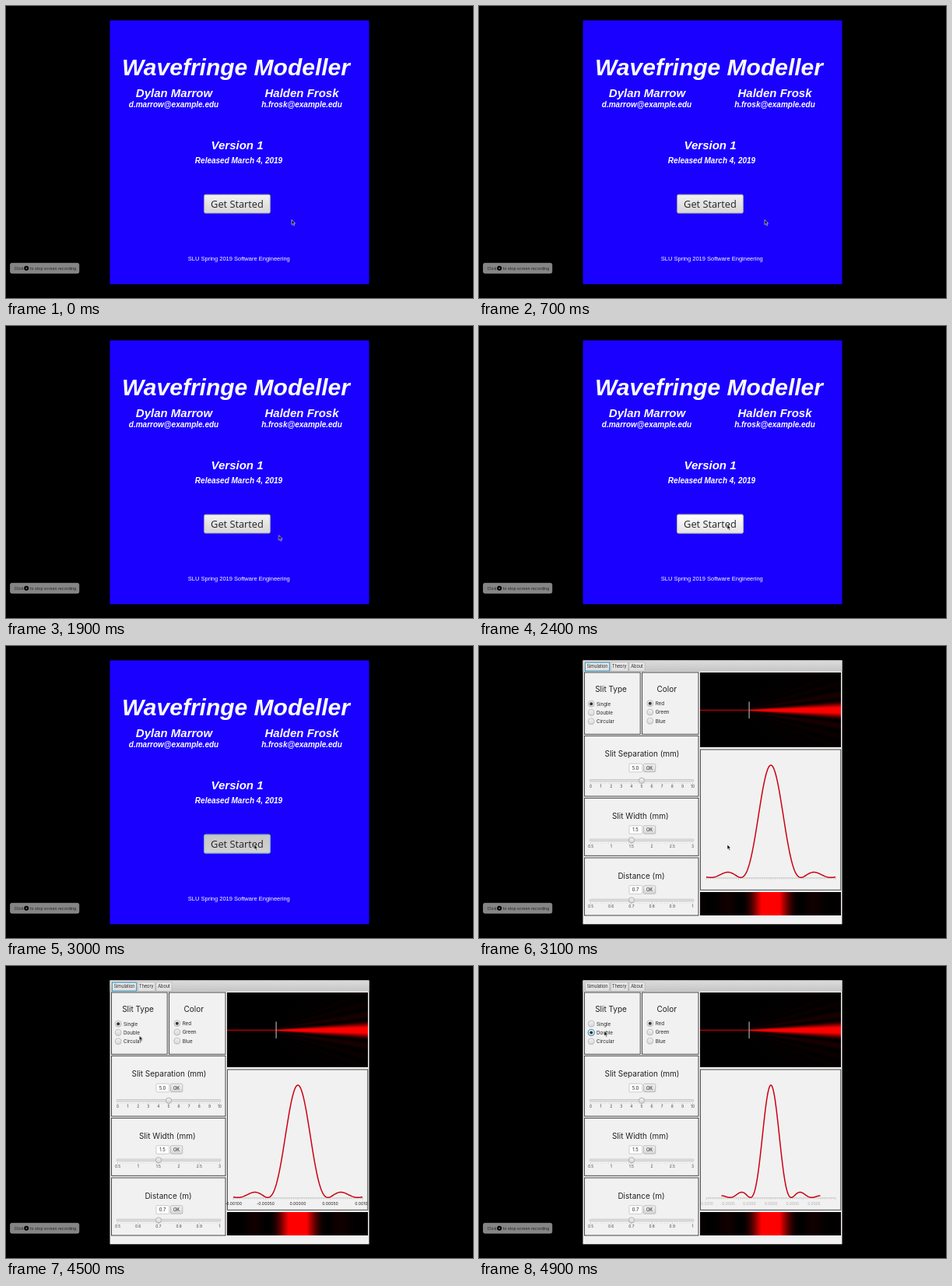
Write an HTML page with a canvas that moves like this. It is 600x375 px and loops after 5000 ms.

```html
<!DOCTYPE html>
<html lang="en">
<head>
<meta charset="utf-8">
<title>Wavefringe Modeller</title>
<style>
  html, body { margin: 0; width: 100%; height: 100%; overflow: hidden; background: #000; }
  svg { position: absolute; left: 0; top: 0; }
  canvas { position: absolute; left: 284px; top: 34px; }
  text { font-family: Inter, "Liberation Sans", sans-serif; fill: #222; }
  .mid { text-anchor: middle; }
  .head text { font: italic bold 15px "Liberation Sans", Arial, sans-serif; fill: #fff; text-anchor: middle; }
  .head .title { font-size: 30px; }
  .head .small { font-size: 10px; }
  .head .foot { font: 7.5px "Liberation Sans", Arial, sans-serif; }
  .start { font: 12.8px "Open Sans", "Noto Sans", sans-serif; }

  .step { animation: 5s step-end infinite; }
  .intro { animation-name: intro; }
  .app { animation-name: app; }
  .hover { animation-name: hover; }
  .press { animation-name: press; }
  .before { animation-name: before; }
  .after { animation-name: after; }
  .wide { animation-name: wide; }
  .narrow { animation-name: narrow; }
  .labels { animation: labels 5s linear infinite; }
  .cursor { animation: move 5s infinite; }

  @keyframes intro { 0% { opacity: 1 } 62%, 100% { opacity: 0 } }
  @keyframes app { 0% { opacity: 0 } 62%, 100% { opacity: 1 } }
  @keyframes hover { 0% { opacity: 0 } 44% { opacity: 1 } 58%, 100% { opacity: 0 } }
  @keyframes press { 0% { opacity: 0 } 58% { opacity: 1 } 62%, 100% { opacity: 0 } }
  @keyframes before { 0% { opacity: 1 } 96%, 100% { opacity: 0 } }
  @keyframes after { 0% { opacity: 0 } 96%, 100% { opacity: 1 } }
  @keyframes wide { 0% { opacity: 1 } 98%, 100% { opacity: 0 } }
  @keyframes narrow { 0% { opacity: 0 } 98%, 100% { opacity: 1 } }
  @keyframes labels {
    0% { opacity: 0 }
    62% { opacity: 0; animation-timing-function: steps(7) }
    76%, 100% { opacity: 1 }
  }
  @keyframes move {
    0% { transform: translate(367px, 274.5px) }
    34% { transform: translate(367px, 274.5px); animation-timing-function: steps(4) }
    42% { transform: translate(334px, 263px); animation-timing-function: steps(3) }
    48% { transform: translate(319px, 255px) }
    66% { transform: translate(319px, 255px); animation-timing-function: steps(7) }
    80% { transform: translate(192px, 101.5px) }
    82% { transform: translate(192px, 101.5px); animation-timing-function: steps(6) }
    94%, 100% { transform: translate(161px, 83.5px) }
  }
</style>
</head>
<body>
<svg id="stage" width="600" height="375" viewBox="0 0 600 375"></svg>
<canvas id="light" width="181" height="312" class="step app"></canvas>
<script>
const sinc2 = u => u ? (Math.sin(Math.PI * u) / (Math.PI * u)) ** 2 : 1;
const range = n => [...Array(n).keys()];

const rect = (x, y, x2, y2, fill, stroke = 'none', more = '') =>
  `<rect x="${x}" y="${y}" width="${x2 - x}" height="${y2 - y}" fill="${fill}" stroke="${stroke}" ${more}/>`;
const text = (x, y, s, size, cls = '', more = '') =>
  `<text x="${x}" y="${y}" class="${cls}" ${size ? `font-size="${size}"` : ''} ${more}>${s}</text>`;
const group = (cls, ...parts) => `<g class="${cls}">${parts.join('')}</g>`;
const dot = (x, y, r, fill, stroke = 'none', w = 0.7) =>
  `<circle cx="${x}" cy="${y}" r="${r}" fill="${fill}" stroke="${stroke}" stroke-width="${w}"/>`;
const grad = (id, a, b) =>
  `<linearGradient id="${id}" x2="0" y2="1"><stop stop-color="${a}"/><stop offset="1" stop-color="${b}"/></linearGradient>`;

const startBox = (fill, stroke) => rect(254.7, 242.2, 339.3, 266, fill, stroke, 'rx="1.5"');

function intro() {
  return group('step intro',
    rect(133.5, 18.5, 466.5, 357.3, '#1a00ff'),
    group('head',
      text(295.5, 88.5, 'Wavefringe Modeller', 0, 'title'),
      text(216, 117, 'Dylan Marrow'),
      text(215.5, 129.7, 'd.marrow@example.edu', 0, 'small'),
      text(380, 117, 'Halden Frosk'),
      text(380, 129.7, 'h.frosk@example.edu', 0, 'small'),
      text(297, 184, 'Version 1'),
      text(299, 202.2, 'Released March 4, 2019', 0, 'small'),
      text(299.3, 327.4, 'SLU Spring 2019 Software Engineering', 0, 'foot')),
    startBox('url(#btn)', '#aaa'),
    group('step hover', startBox('url(#btnHover)', '#bbb')),
    group('step press', startBox('url(#btnPress)', '#79a9c9')),
    text(297, 258.6, 'Get Started', 0, 'start mid'));
}

const radio = (x, y, label) =>
  dot(x, y, 4, 'url(#btn)', '#aaa') + text(x + 6.9, y + 2.3, label, 6.2);

const panel = (x, y, x2, y2) => rect(x, y, x2, y2, '#f1f1f1', '#333', 'stroke-width=".9"');

function tabs() {
  const tab = (x, x2, label) =>
    rect(x, 21, x2, 32.4, 'url(#tab)', '#aaa', 'stroke-width=".6"') + text((x + x2) / 2, 28.4, label, 5.5, 'mid');
  return rect(133.5, 18.5, 466.5, 32, 'url(#strip)') +
    rect(133.5, 32, 466.5, 32.6, '#b4b4b4') +
    tab(136.3, 167.7, 'Simulation') + tab(169.3, 191.5, 'Theory') + tab(193, 213, 'About') +
    group('step before', rect(136.4, 21.2, 167.6, 32, 'none', '#2f9bc9', 'stroke-width=".9"'));
}

function slider(title, tx, ty, fy, value, sy, thumb, labels) {
  const gap = 131 / (labels.length - 1);
  const minor = range(41).map(i => `M${143.5 + i * 3.275} ${sy + 3.2}v1`).join('');
  const major = labels.map((l, i) => `M${143.5 + i * gap} ${sy + 3.2}v2`).join('');
  return text(tx, ty, title, 10, 'mid') +
    rect(193, fy - 5.3, 209.7, fy + 5.3, '#fff', '#bbb', 'rx="1" stroke-width=".7"') +
    text(201, fy + 2.1, value, 5.9, 'mid') +
    rect(211.5, fy - 5.2, 226.8, fy + 5.2, 'url(#btn)', '#aaa', 'rx="1.2" stroke-width=".7"') +
    text(219.1, fy + 2.1, 'OK', 5.7, 'mid') +
    rect(142, sy - 1.3, 276, sy + 1.3, '#e0e0e0', '#b5b5b5', 'rx="1.2" stroke-width=".6"') +
    `<path d="${minor}${major}" stroke="#aaa" stroke-width=".4"/>` +
    dot(thumb, sy, 3.6, 'url(#btn)', '#999') +
    labels.map((l, i) => text(143.5 + i * gap, sy + 9.6, l, 4.9, 'mid', 'fill-opacity=".85"')).join('');
}

// Single-slit pattern: first dark fringe at `zero`, drawn out to `reach`
function curve(zero, reach) {
  const pts = range(201).map(i => {
    const x = (i / 100 - 1) * reach;
    return `${(375 + x).toFixed(2)} ${(297.3 - 144.3 * sinc2(x / zero)).toFixed(2)}`;
  });
  return `<path d="M${pts.join('L')}" fill="none" stroke="#cc0012" stroke-width="1.5" stroke-linejoin="round"/>`;
}

function chart() {
  const ticks = range(61).map(i => `M${292 + i * 2.767} 297.8v${i % 15 ? 1.6 : 2.6}`).join('');
  const wideLabels = range(5).map(i => text(292 + i * 41.5, 306.8, ((i - 2) * 0.0005).toFixed(5), 5.2, 'mid'));
  const newLabels = ['-0.0010', '-0.0005', '0.0000', '0.0000', '0.0000', '0.0005']
    .map((l, i) => text(292 + i * 27.7, 306.6, l, 4.9, 'mid', 'opacity=".3"'));
  return panel(284.4, 133, 464.8, 313.3) +
    `<path d="M292 297.8H458.5${ticks}" stroke="#aaa" stroke-width=".5"/>` +
    `<g clip-path="url(#plot)">` +
    group('step wide', group('labels', ...wideLabels), curve(38.6, 83)) +
    group('step narrow', ...newLabels, curve(26.2, 63.5)) + '</g>';
}

function app() {
  return group('step app',
    rect(133.5, 18.5, 466.5, 357.3, '#f1f1f1'),
    tabs(),
    panel(135.5, 34, 207.2, 113.3), panel(209.5, 34, 282, 113.3),
    panel(135.5, 115.4, 282, 193), panel(135.5, 195.3, 282, 269.3), panel(135.5, 272, 282, 346),
    text(169.5, 58.7, 'Slit Type', 10, 'mid'), text(241.2, 58.9, 'Color', 10, 'mid'),
    radio(144.2, 74.2, 'Single'), radio(144.2, 85.5, 'Double'), radio(144.2, 96.8, 'Circular'),
    radio(219.8, 73.7, 'Red'), radio(219.8, 85, 'Green'), radio(219.8, 96.3, 'Blue'),
    dot(219.8, 73.7, 2, '#333'),
    group('step before', dot(144.2, 74.2, 2, '#333')),
    group('step after', dot(144.2, 85.5, 4, 'url(#btnHover)', '#2f8fc4', 1.1), dot(144.2, 85.5, 2, '#333')),
    slider('Slit Separation (mm)', 209.5, 141.5, 156.5, '5.0', 172.8, 209, range(11)),
    slider('Slit Width (mm)', 207.3, 222, 236, '1.5', 249.3, 196, [0.5, 1, 1.5, 2, 2.5, 3]),
    slider('Distance (m)', 208.5, 299, 313, '0.7', 326.5, 196, [0.5, 0.6, 0.7, 0.8, 0.9, 1]),
    chart());
}

function recorder() {
  return rect(5.5, 330.3, 93.8, 343.2, '#858585', '#a0a0a0', 'rx="2" stroke-width=".6"') +
    text(10.5, 338.8, 'Click', 5.2) + dot(26.2, 336.8, 3, '#000') + dot(26.2, 336.8, 0.9, '#999') +
    text(30.8, 338.8, 'to stop screen recording', 5.15);
}

const cursor = `<path class="cursor" d="M0 0V6.3L1.5 5L2.6 7.4L3.7 6.9L2.6 4.6H4.6Z"
  fill="#000" stroke="#fff" stroke-width=".6"/>`;

stage.innerHTML = '<defs>' +
  grad('btn', '#f2f2f2', '#d6d6d6') + grad('btnHover', '#ffffff', '#e4e4e4') +
  grad('btnPress', '#c6c6c6', '#d2d2d2') + grad('tab', '#eeeeee', '#dedede') +
  grad('strip', '#dcdcdc', '#c6c6c6') +
  '<clipPath id="plot"><rect x="282.5" y="133" width="182" height="180"/></clipPath></defs>' +
  intro() + app() + recorder() + cursor;

// Light path behind the slit, and the pattern on the screen
const ctx = light.getContext('2d');
const red = (x, y, w, h, v) => {
  ctx.fillStyle = `rgb(${Math.round(255 * Math.min(1, v))},0,0)`;
  ctx.fillRect(x, y, w, h);
};
for (let x = 0; x < 181; x++) {
  for (let y = 0; y < 96; y++) {
    const spread = 1.5 + 12.5 * (x - 63) / 118;
    const v = x < 63 ? 0.65 * Math.exp(-(((y - 48) / 0.9) ** 2))
      : 1.15 * sinc2((y - 48) / spread) ** 0.8;
    red(x, y, 1, 1, v);
  }
  red(x, 282, 1, 30, 1.35 * sinc2((x - 90) / 38.6));
}
ctx.fillStyle = '#aaa';
ctx.fillRect(62.5, 37.5, 1.2, 21.5);
</script>
</body>
</html>
```
